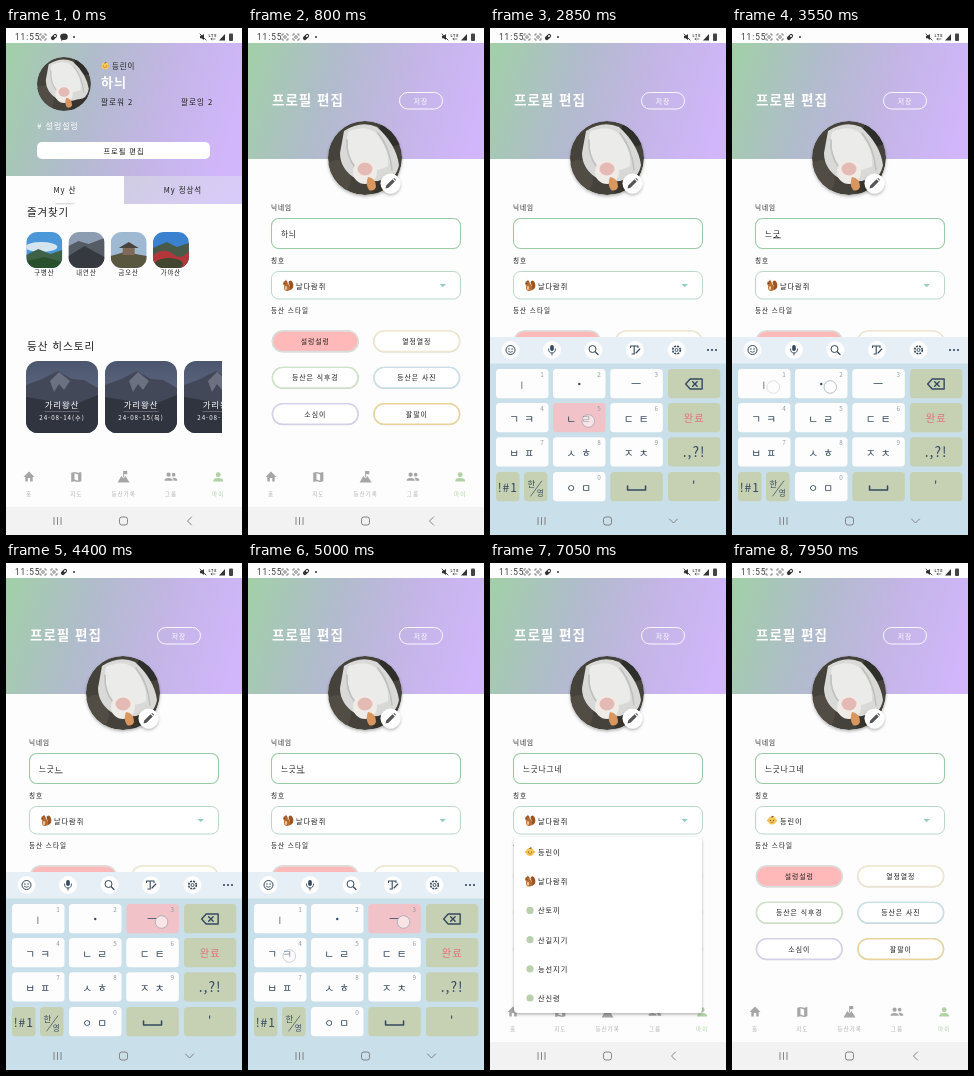
An HTML page for the animation above (8000 ms loop, 236 by 507 pixels).

```html
<!DOCTYPE html>
<html lang="ko">
<head>
<meta charset="utf-8">
<title>프로필 편집</title>
<style>
html, body { margin: 0; width: 100%; height: 100%; overflow: hidden; background: #fdfdfd; }
svg { display: block; width: 100vw; height: 100vh; font-family: "Noto Sans CJK KR", "Noto Sans CJK JP", "Noto Sans CJK", sans-serif; letter-spacing: .06em; }
.u { text-decoration: underline; }
</style>
</head>
<body>
<svg id="stage" viewBox="0 0 236 507"></svg>
<script>
const LOOP = 8000, RELEASE = 60;
const INK = '#1c1c1c', PAGE = '#fdfdfd', KEY_BG = '#c9dfe9', FN = '#c6d1b4', PINK = '#f1c3c8', SLATE = '#34485e';
const GRAY = '#a6a6a6', GREEN = '#b0d2a5';

const rect = (x, y, w, h, r, fill, more = '') =>
  `<rect x="${x}" y="${y}" width="${w}" height="${h}" rx="${r}" fill="${fill}" ${more}/>`;
const circle = (x, y, r, fill, more = '') => `<circle cx="${x}" cy="${y}" r="${r}" fill="${fill}" ${more}/>`;
const oval = (x, y, rx, ry, fill, more = '') =>
  `<ellipse cx="${x}" cy="${y}" rx="${rx}" ry="${ry}" fill="${fill}" ${more}/>`;
const path = (d, fill, more = '') => `<path d="${d}" fill="${fill}" ${more}/>`;
const line = (d, color, w = 1, more = '') =>
  path(d, 'none', `stroke="${color}" stroke-width="${w}" stroke-linecap="round" stroke-linejoin="round" ${more}`);
const text = (x, y, size, str, fill = INK, more = '') =>
  `<text x="${x}" y="${y}" font-size="${size * .93}" fill="${fill}" ${more}>${str}</text>`;
const mid = (x, y, size, str, fill = INK, more = '') =>
  text(x, y, size, str, fill, 'text-anchor="middle" ' + more);
const group = (id, body, more = '') => `<g id="${id}" ${more}>${body}</g>`;
const at = (x, y, body, s = 1) => `<g transform="translate(${x} ${y}) scale(${s})">${body}</g>`;
const clip = (id, shape) => `<clipPath id="${id}">${shape}</clipPath>`;
const grad = (id, stops, dir) => `<linearGradient id="${id}" ${dir}>` +
  stops.map((c, i) => `<stop offset="${i / (stops.length - 1)}" stop-color="${c}"/>`).join('') + '</linearGradient>';

const defs = '<defs>' +
  grad('head', ['#a2ceaa', '#b0bccb', '#c3b5e5', '#d1b6fb'], 'gradientUnits="userSpaceOnUse" x1="0" y1="45" x2="226" y2="110"') +
  grad('tab', ['#cfcde2', '#d9cbf9'], 'x1="0" y1="0" x2="1" y2=".2"') +
  grad('dusk', ['#4d566f', '#5f6880', '#3a3f4e'], 'x1="0" y1="0" x2="0" y2="1"') +
  clip('face', circle(0, 0, 37, '#000')) +
  clip('thumb', rect(0, 0, 36, 36, 11, '#000')) +
  clip('card', rect(0, 0, 72, 72, 12, '#000')) +
  clip('strip', rect(0, 320, 216, 100, 0, '#000')) +
  '<filter id="soft" x="-30%" y="-30%" width="160%" height="160%"><feDropShadow dx="0" dy="1.5" stdDeviation="1.5" flood-opacity=".3"/></filter></defs>';

// Shared drawings
const bird = '<g clip-path="url(#face)">' + circle(0, 0, 37, '#45423b') +
  oval(24, 27, 20, 12, '#37342f') + oval(-28, 20, 14, 18, '#514d45') + oval(28, -26, 14, 14, '#2f2d2a') +
  path('M-21 -27Q-4 -38 12 -31Q31 -14 34 7Q31 22 19 21Q8 26 -9 21Q-25 11 -25 -5Z', '#d9dad8') +
  path('M-17 -26Q0 -34 11 -25Q25 -8 23 8Q8 16 -8 10Q-22 -4 -17 -26Z', '#ebebe9') +
  line('M13 -25Q25 -10 27 12M-18 -18Q-19 -2 -10 9', '#bfc0be', 1.6) +
  oval(0, 14, 12, 12, '#efebe7') + oval(0, 11, 7.5, 6.5, '#e6bab4') +
  path('M3 19Q11 20 11 29Q9 34 4 32Q0 26 3 19Z', '#d9965f') + '</g>';
const baby = circle(0, 0, 4, '#f4c95a') + path('M-1 -3Q0 -6 2 -4Q1 -3 -1 -3Z', '#8a5a2b') +
  circle(-4, 0, 1.1, '#e9b545') + circle(4, 0, 1.1, '#e9b545') +
  circle(-1.5, 0, .55, '#553a1c') + circle(1.5, 0, .55, '#553a1c') + line('M-1.2 1.8Q0 2.7 1.2 1.8', '#b0532c', .6);
const squirrel = path('M1 5C7 4 6 -3 3 -5C0 -5 0 -2 2 0Z', '#9b5523') +
  oval(-1, 2, 3, 3.4, '#b8692c') + circle(-2.5, -2, 2.4, '#b8692c') +
  path('M-3 -4L-2 -6L-1 -3Z', '#8a4a1d') + circle(-3.2, -2.2, .5, '#2a1a10') + oval(-2, 2.5, 1.2, 2, '#edc79b');

const scan = (id, x) => at(x, 9, line('M-3 -1.5V-3H-1.5M1.5 -3H3V-1.5M3 1.5V3H1.5M-1.5 3H-3V1.5', '#555', .7) +
  circle(0, 0, 1.3, 'none', `id="${id}" stroke="#555" stroke-width=".7"`));
const pill = x => at(x, 9, '<g transform="rotate(-45)">' + rect(-3.6, -1.9, 7.2, 3.8, 1.9, '#333') +
  rect(.3, -.9, 2.2, 1.8, .9, '#fff') + '</g>');
const statusBar = rect(0, 0, 236, 15, 0, PAGE) +
  text(9, 12.2, 8.9, '11:55', '#3a3a3a', 'font-family="Roboto, sans-serif"') + scan('eye', 37) +
  group('iconsA', pill(48) + oval(58, 8.7, 3.8, 3.2, '#333') + path('M55 10L55.5 13L58 11Z', '#333')) +
  group('iconsB', scan('eye2', 48) + pill(58)) + circle(68, 9, 1, '#333') +
  at(197, 9, path('M-3 -1.2H-1.4L1 -3V3L-1.4 1.2H-3Z', '#333') + line('M-3 -3L3 3', '#333', .9)) +
  mid(207, 8.5, 4, 'LTE', '#333', 'font-weight="700"') + line('M205 11H209M206 10L205 11L206 12', '#333', .6) +
  path('M213 12.5H219V6Z', '#333') + rect(223, 5.5, 4, 7.5, 1, '#444');

const navIcons = [
  path('M-6 0L0 -6L6 0H4V5H1.3V1H-1.3V5H-4V0Z', GRAY),
  path('M-5.5 -4.5L-2 -5.5L2 -4.5L5.5 -5.5V4.5L2 5.5L-2 4.5L-5.5 5.5Z', GRAY) +
    path('M-2 -4L2 -2.7V4L-2 2.7Z', PAGE),
  path('M-6.5 6L-2.5 -1L0 1.5L2 -1L6.5 6Z', GRAY) + line('M0 0V-6', GRAY, 1) + path('M0 -6.5H4V-3H0Z', GRAY),
  circle(-2.5, -2.5, 2.3, GRAY) + circle(3, -2.5, 2, GRAY) + path('M-7 4Q-7 1 -2.5 1T2 4ZM3 4Q3 2 1.8 1Q7 .5 7 4Z', GRAY),
  circle(0, -2.5, 2.7, GREEN) + path('M-5.5 5Q-5.5 1.2 0 1.2T5.5 5Z', GREEN)
];
const navBar = rect(0, 430, 236, 49, 0, PAGE) + ['홈', '지도', '등산기록', '그룹', '마이'].map((s, i) => {
  const x = 23 + 47.3 * i;
  return at(x, 449, navIcons[i], .92) + mid(x, 468, 6, s, i == 4 ? GREEN : '#b2b2b2');
}).join('');

// Profile page
const thumbArt = [
  rect(0, 0, 36, 36, 0, '#4b97d8') + oval(15, 15, 16, 5, '#d5e5ef') + path('M0 23L12 17L24 22L36 18V36H0Z', '#3f6246') + path('M0 29L18 25L36 30V36H0Z', '#28502d'),
  rect(0, 0, 36, 36, 0, '#8c9db2') + path('M0 14L10 9L20 12L36 6V36H0Z', '#565c66') + path('M0 24L16 14L36 25V36H0Z', '#363a40'),
  rect(0, 0, 36, 36, 0, '#9fb9d2') + path('M0 24L14 20L36 24V36H0Z', '#59573f') + path('M8 16L18 10L28 16Z', '#4a443f') + rect(12, 16, 12, 7, 0, '#7e6a57'),
  rect(0, 0, 36, 36, 0, '#3a82cf') + path('M0 16L14 10L24 15L36 11V36H0Z', '#495a49') + path('M0 23Q12 15 20 22T36 19V36H0Z', '#b3373a') + oval(16, 32, 14, 6, '#42452f')
];
const thumbs = ['구병산', '내연산', '금오산', '가야산'].map((s, i) => {
  const x = 20.3 + 42.2 * i;
  return at(x, 204, `<g clip-path="url(#thumb)">${thumbArt[i]}</g>`) + mid(x + 18, 246.5, 6.8, s, INK, 'font-weight="500"');
}).join('');
const cards = ['24-08-14(수)', '24-08-15(목)', '24-08-15(목)'].map((s, i) =>
  at(20 + 79 * i, 333, '<g clip-path="url(#card)">' + rect(0, 0, 72, 72, 0, 'url(#dusk)') +
    path('M0 24L16 18L32 10L46 18L58 19L72 27V72H0Z', '#424858') + path('M24 20L33 11L44 20L38 29L33 23L28 31Z', '#6b7181') +
    path('M0 36L24 40L40 47L72 34V72H0Z', '#30343f') + '</g>' +
    mid(36, 46.5, 9, '가리왕산', '#fff', 'font-weight="500"') + line('M19 50.5H53', '#aeb2bd', .4) +
    mid(36, 59, 6.7, s, '#fff'))).join('');
const home = rect(0, 15, 236, 465, 0, PAGE) + rect(0, 15, 236, 133, 0, 'url(#head)') +
  at(58, 56, bird, 27 / 37) + at(99, 38, baby, .85) + text(106, 41, 8, '등린이') +
  text(95, 59, 14, '하늬', '#fff', 'font-weight="700"') +
  text(95, 77, 8.2, '팔로워 2') + text(175, 77, 8.2, '팔로잉 2') + text(31, 100.5, 8.6, '# 설렁설렁', '#fff') +
  rect(31, 114, 173, 17, 5, '#fff') + mid(118, 125.5, 7.8, '프로필 편집') +
  rect(118, 148, 118, 28, 0, 'url(#tab)') + mid(59, 165, 8.2, 'My 산') + mid(177, 165, 8, 'My 정상석') +
  line('M50 175.8H68', '#bbb', .7) + text(21, 188, 11.2, '즐겨찾기') + thumbs +
  text(21, 322, 11.4, '등산 히스토리') + `<g clip-path="url(#strip)">${cards}</g>`;

// Edit page
const chipList = [['설렁설렁', '#dcdcda'], ['열정열정', '#efe8d0'], ['등산은 식후경', '#cfe3c7'],
  ['등산은 사진', '#c9e0e8'], ['소심이', '#d3d1e8'], ['팔팔이', '#e8d59c']];
const chips = chipList.map(([s, c], i) => {
  const x = 24 + 101.5 * (i % 2), y = 302.5 + 36.4 * (i >> 1);
  return rect(x - .3, y - .1, 87.1, 22.1, 11, '#cfcfcf') +
    rect(x + .5, y + .5, 85.5, 20.5, 10.2, i ? '#fff' : '#ffb9b9', `stroke="${c}" stroke-width="1.4"`) +
    mid(x + 43.3, y + 13.5, 7.4, s);
}).join('');
const titles = ['등린이', '날다람쥐', '산토끼', '산길지기', '능선지기', '산신령'];
const menu = rect(24, 274, 188, 176, 4, '#fff', 'filter="url(#soft)"') + titles.map((s, i) => {
  const y = 289 + 29.2 * i;
  return (i < 2 ? at(40, y, i ? squirrel : baby) : circle(40, y, 3.6, '#b9cfae')) + text(48, y + 3, 7.7, s);
}).join('');
const edit = rect(0, 15, 236, 465, 0, PAGE) + rect(0, 15, 236, 116, 0, 'url(#head)') +
  text(24, 77, 14.6, '프로필 편집', '#fff', 'font-weight="700"') +
  rect(151.5, 64.5, 43, 16.5, 8.2, 'none', 'stroke="#fff" stroke-width=".9"') + mid(173, 75.5, 7.4, '저장', '#fff') +
  `<g filter="url(#soft)">${at(117, 130, bird)}</g>` +
  circle(142.5, 155.5, 10, '#fff', 'filter="url(#soft)"') +
  at(142.5, 155.5, path('M-5 5L-4.3 2L2 -4.3L4.3 -2L-2 4.3ZM2.8 -5L3.7 -5.5L5.5 -3.7L5 -2.8Z', '#555')) +
  text(23, 181.5, 7.1, '닉네임') + rect(23.5, 190.5, 189, 30, 7, '#fff', 'stroke="#9bcba6" stroke-width="1.1"') +
  text(33, 208.5, 8.1, '', INK, 'id="nick"') +
  text(23, 234.5, 7.1, '칭호') + rect(23.5, 243.5, 189, 27.5, 7, '#fff', 'stroke="#b3d3c2" stroke-width=".9"') +
  group('oldTitle', at(40, 257.5, squirrel) + text(48, 260.5, 7.7, '날다람쥐')) +
  group('newTitle', at(40, 257.5, baby) + text(48, 260.5, 7.7, '등린이')) +
  path('M191.5 256H198L194.7 259.3Z', '#95cfbf') + text(23, 285, 7.1, '등산 스타일') + chips;

// Keyboard
const cols = [6, 63, 120.3, 178], rows = [341, 375, 409.3, 444];
const keys = {};
const addKey = (name, x, y, w, fill, label, digit) => { keys[name] = { x, y, w, fill, label, digit }; };
const jamo = (size, s) => mid(0, 4.2, size, s, SLATE);
const pair = s => mid(-7.5, 5, 11.5, s[0], SLATE) + mid(7.5, 5, 11.5, s[1], SLATE);
['ㅣ', '·', 'ㅡ', 'ㄱㅋ', 'ㄴㄹ', 'ㄷㅌ', 'ㅂㅍ', 'ㅅㅎ', 'ㅈㅊ', 'ㅇㅁ'].forEach((s, i) => {
  const c = i == 9 ? 1 : i % 3, r = Math.floor(i / 3);
  const label = s == '·' ? circle(0, 0, 1.2, SLATE) : s == 'ㅣ' ? jamo(9, s) : s == 'ㅡ' ? jamo(12, s) : pair(s);
  addKey(s, cols[c], rows[r], 52.5, PAGE, label, (i + 1) % 10);
});
addKey('back', 178, rows[0], 52.3, FN, line('M-8.5 0L-4 -5H8V5H-4ZM-1.5 -2.2L3 2.2M3 -2.2L-1.5 2.2', SLATE, 1.4));
addKey('done', 178, rows[1], 52.3, FN, mid(0, 4, 11, '완료', '#e4717c'));
addKey('punct', 178, rows[2], 52.3, FN, mid(0, 4.5, 15, '.,?!', SLATE));
addKey('sym', 6, rows[3], 23.5, FN, mid(0, 5, 13, '!#1', SLATE));
addKey('lang', 34, rows[3], 23.5, FN, mid(-4, 0, 9, '한', SLATE) + mid(5, 9, 8, '영', SLATE) + line('M-5 9L6 -6', SLATE, .7));
addKey('space', cols[2], rows[3], 52.5, FN, line('M-9 -1V3H9V-1', SLATE, 1.5));
addKey('quote', 178, rows[3], 52.3, FN, mid(0, 4, 13, "'", SLATE));

const tools = [
  circle(0, 0, 4.5, 'none', `stroke="${SLATE}"`) + circle(-1.6, -1, .7, SLATE) + circle(1.6, -1, .7, SLATE) + line('M-2 1.5Q0 3.2 2 1.5', SLATE, .8),
  rect(-1.8, -5, 3.6, 6, 1.8, SLATE) + line('M-3.5 -1Q-3.5 3 0 3T3.5 -1M0 3V5', SLATE, .9),
  circle(-1, -1, 3.5, 'none', `stroke="${SLATE}"`) + line('M2 2L4.5 4.5', SLATE, 1.2),
  line('M-4.5 -2.5V-4H3V-2.5M-.8 -4V4H-3M1 3L4.8 -1', SLATE, 1.1),
  circle(0, 0, 3.8, 'none', `stroke="${SLATE}" stroke-width="1.6" stroke-dasharray="2 1"`) + circle(0, 0, 1.5, 'none', `stroke="${SLATE}" stroke-width=".9"`)
];
const keyboard = rect(0, 309, 236, 200, 0, KEY_BG) + rect(0, 309, 236, 26.5, 0, '#e7eff6') +
  tools.map((s, i) => at(20.5 + 41.5 * i, 322, circle(0, 0, 9, PAGE) + s)).join('') +
  [218, 222, 226].map(x => circle(x, 322, 1.1, SLATE)).join('') +
  Object.entries(keys).map(([name, k]) =>
    rect(k.x, k.y, k.w, 29.3, 3.5, k.fill, `id="key-${name}"`) + at(k.x + k.w / 2, k.y + 15, k.label) +
    (k.digit == null ? '' : mid(k.x + k.w - 6, k.y + 8, 6.8, k.digit, '#8f9ba6'))).join('');

const sysBar = rect(0, 479, 236, 28, 0, '#f2f2f2', 'id="sysBg"') + line('M48 489.5V496.5M51.5 489.5V496.5M55 489.5V496.5', '#777', .9) +
  rect(113.5, 489, 8, 8, 2.3, 'none', 'stroke="#777" stroke-width=".9"') + line('M185.5 489L181.5 493L185.5 497', '#777', .9, 'id="backIcon"') +
  line('M179.5 491L183.5 495L187.5 491', '#777', .9, 'id="downIcon"');

// Touches: time, key or point, field text after release
const taps = [
  [230, [118, 123]], [1060, [92, 206]],
  [1850, 'back', '하'], [2150, 'back', ''],
  [2820, 'ㄴㄹ', 'ㄴ'], [2940, 'ㅣ', '느'], [3040, '·', '늑'], [3150, 'ㅣ', '느그'], [3270, 'ㄱㅋ', '느긋'],
  [3370, 'ㅣ', '느긋'], [3480, '·', '느긋'],
  [4050, 'ㄴㄹ', '느긋ㄴ'], [4400, 'ㅡ', '느긋니'], [4700, '·', '느긋나'], [4870, 'ㄱㅋ', '느긋낙'],
  [4970, 'ㅡ', '느긋나그'], [5120, '·', '느긋나그'], [5260, 'ㄱㅋ', '느긋나근'],
  [5380, '·', '느긋나그너'], [5490, 'ㅣ', '느긋나그네'], [5600, 'ㅣ', '느긋나그네'], [5720, 'done', '느긋나그네'],
  [6250, [150, 258]], [7600, [72, 291]]
];
const spot = where => {
  if (Array.isArray(where)) return where;
  const k = keys[where];
  return [k.x + k.w / 2 + 9, k.y + 18];
};
const rings = taps.map(([, where], i) =>
  circle(...spot(where), 6.3, '#fff', `id="ring${i}" fill-opacity=".55" stroke="#9aa3aa" stroke-width=".7"`)).join('');

const stage = document.getElementById('stage');
stage.innerHTML = defs + rect(0, 0, 236, 507, 0, PAGE) + group('home', home) + group('edit', edit) + navBar +
  group('menu', menu) + group('keyboard', keyboard) + sysBar + statusBar + rings;

const $ = id => document.getElementById(id);
const show = (id, on) => { $(id).style.display = on ? '' : 'none'; };
const clamp = v => Math.min(1, Math.max(0, v));
const easeOut = v => 1 - (1 - clamp(v)) ** 3;
const nick = $('nick');

function render(t) {
  const onEdit = t >= 550;
  show('home', !onEdit);
  show('edit', onEdit);
  show('iconsA', !onEdit);
  show('iconsB', onEdit);
  show('eye', t < 7700);

  const up = easeOut((t - 1200) / 220) - easeOut((t - 5780) / 160);
  $('keyboard').setAttribute('transform', `translate(0 ${200 * (1 - up)})`);
  const typing = t >= 1200 && t < 5900;
  show('keyboard', typing);
  show('backIcon', !typing);
  show('downIcon', typing);
  $('sysBg').setAttribute('fill', typing ? KEY_BG : '#f2f2f2');

  let value = '하늬', pressed = '';
  taps.forEach(([start, where, str], i) => {
    const age = t - start;
    if (str != null && age >= RELEASE) value = str;
    if (age >= 0 && age < RELEASE && typeof where == 'string') pressed = where;
    $('ring' + i).style.opacity = age < 0 ? 0 : clamp(1 - (age - 80) / 180);
  });
  for (const name in keys) $('key-' + name).setAttribute('fill', name == pressed ? PINK : keys[name].fill);

  const composing = t > 2820 && t < 5780 && value;
  nick.innerHTML = composing ? `${value.slice(0, -1)}<tspan class="u">${value.slice(-1)}</tspan>` : value;

  show('menu', t >= 6380 && t < 7780);
  $('menu').style.opacity = clamp((t - 6380) / 120) * clamp((7780 - t) / 80);
  show('oldTitle', t < 7720);
  show('newTitle', t >= 7720);
}

const began = performance.now();
function tick() {
  render((performance.now() - began) % LOOP);
  requestAnimationFrame(tick);
}
tick();
</script>
</body>
</html>
```
